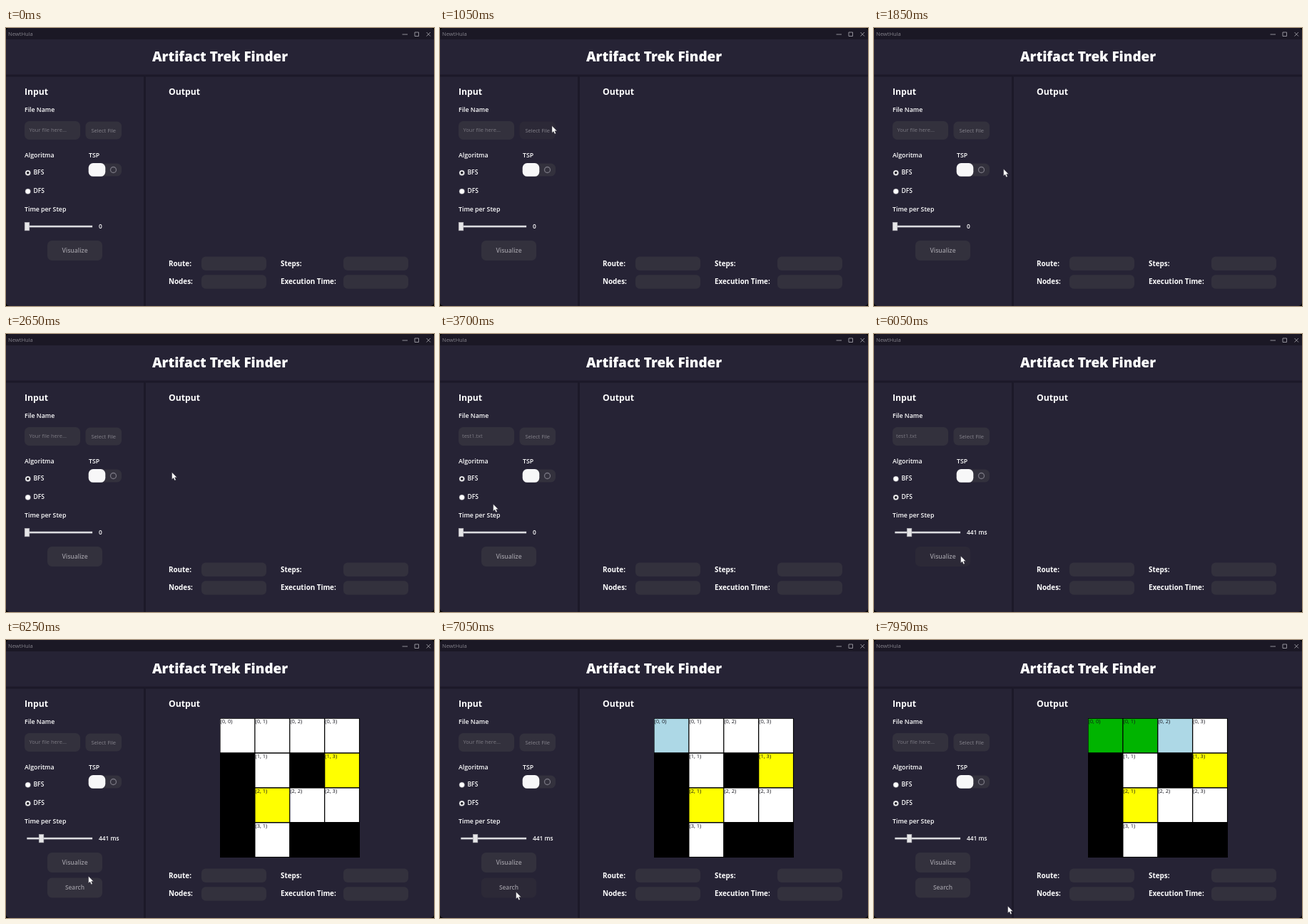
An HTML page that plays this animation: 600 px wide and 391 px high, repeating every 8000 ms.

```html
<!DOCTYPE html>
<html lang="en">
<head>
<meta charset="utf-8">
<title>Grid path demo</title>
<style>
  html, body { margin: 0; width: 100%; height: 100%; overflow: hidden; background: #000; }
  svg { display: block; width: 100vw; height: 100vh; background: #262335; border-radius: 5px; }
  text { font-family: "Open Sans", "Noto Sans", sans-serif; }
</style>
</head>
<body>
<svg id="stage" viewBox="0 0 600 391"></svg>
<script>
const NS = "http://www.w3.org/2000/svg";
const stage = document.getElementById("stage");
const LOOP = 8000, TICK = 50;
const FIELD = "#33313d", HOVER = "#2c2937", EDGE = "#1c1929", DIM = "#85838c";

function add(tag, attrs, parent = stage) {
  const el = document.createElementNS(NS, tag);
  for (const k in attrs) el.setAttribute(k, attrs[k]);
  parent.appendChild(el);
  return el;
}
const rect = (x, y, width, height, fill, rx = 0, parent) =>
  add("rect", { x, y, width, height, fill, rx }, parent);

function label(str, x, y, size, weight = 400, fill = "#fff", anchor = "start", parent) {
  const el = add("text", { x, y, "font-size": size, "font-weight": weight, fill, "text-anchor": anchor }, parent);
  el.textContent = str;
  return el;
}
const heading = (str, x) => label(str, x, 93.5, 12.2, 700);
const caption = (str, x, y) => label(str, x, y, 8.75, 600);

function button(str, x, y, w, h, size, weight, fill) {
  const g = add("g", {});
  const box = rect(x, y, w, h, FIELD, 6.5, g);
  label(str, x + w / 2, y + h / 2 + size * 0.34, size, weight, fill, "middle", g);
  const hover = (px, py) => {
    const over = px >= x && px <= x + w && py >= y && py <= y + h;
    box.setAttribute("fill", over ? HOVER : FIELD);
  };
  return { g, hover };
}

function radio(str, y) {
  add("circle", { cx: 30.7, cy: y, r: 3.8, fill: "#fff", stroke: "#5d5b68", "stroke-width": 0.5 });
  const dot = add("circle", { cx: 30.7, cy: y, r: 1.9, fill: "#211f2b" });
  label(str, 38.5, y + 2.6, 8.5, 600);
  return dot;
}

const show = (el, on) => el.setAttribute("visibility", on ? "visible" : "hidden");

// Window frame
rect(0, 0, 600, 16, "#1b1825");
label("NewtHula", 3, 11, 7.6, 400, DIM);
add("path", { d: "M555.5 9H563M573 6H578.5V11.5H573ZM589.5 6L595 11.5M595 6L589.5 11.5",
  fill: "none", stroke: "#b0afb6", "stroke-width": 0.8 });
rect(0, 65.5, 600, 3, EDGE);
rect(193, 68, 3, 323, EDGE);
label("Artifact Trek Finder", 300, 46.5, 18.9, 800, "#fff", "middle");

// Input panel
heading("Input", 26);
caption("File Name", 26, 118);
rect(26, 131, 78, 26, FIELD, 6.5);
const fileText = label("", 32, 146.3, 7.5, 400, "#7b7982");
const pick = button("Select File", 111.5, 131.5, 50.5, 25, 7.55, 400, DIM);
caption("Algoritma", 26, 181.5);
caption("TSP", 116, 181.5);
rect(116, 190.5, 46, 18, FIELD, 6.5);
rect(115.7, 190, 23.6, 18.8, "#f7f7f8", 6.5);
add("circle", { cx: 150.5, cy: 199.5, r: 4, fill: "none", stroke: "#777580", "stroke-width": 1.3 });
const bfs = radio("BFS", 203.7);
const dfs = radio("DFS", 229.8);
caption("Time per Step", 26, 257.5);
rect(29.3, 277.8, 91.8, 2.6, "#dcdce0");
const knob = rect(0, 273.3, 6.6, 11.6, "#e6e6e8");
knob.setAttribute("stroke", "#adacb2");
knob.setAttribute("stroke-width", 0.6);
const delay = label("0", 130, 281.6, 8.4, 600);
const visualize = button("Visualize", 58, 299, 77, 28, 8.6, 600, "#9b99a1");
const search = button("Search", 58, 334.5, 77, 28, 8.4, 600, "#9b99a1");

// Output panel
heading("Output", 228);
[["Route:", "Nodes:"], ["Steps:", "Execution Time:"]].forEach((names, col) =>
  names.forEach((str, row) => {
    label(str, 228 + col * 157, 334.6 + row * 25.6, 9.85, 700);
    rect(274 + col * 199, 321.5 + row * 25.7, 91, 19.5, FIELD, 6);
  }));

// Maze: "." open, "T" treasure, "#" wall
const maze = add("g", {});
rect(300, 110, 196, 196, "#000", 0, maze);
const topRow = [];
["....", "#.#T", "#T..", "#.##"].forEach((line, r) => [...line].forEach((ch, c) => {
  if (ch === "#") return;
  const x = 300.6 + 48.9 * c, y = 110.8 + 48.9 * r;
  const cell = rect(x, y, 47.6, 47.4, ch === "T" ? "#ffff00" : "#fff", 0, maze);
  label(`(${r}, ${c})`, x, y + 6.6, 7.5, 400, "#14141c", "start", maze);
  if (r === 0) topRow.push(cell);
}));

const arrow = add("path", { d: "M.6 .2v9.9l2.2-2l1.6 3.6l1.8-.8l-1.6-3.5h3.1z",
  fill: "#fff", stroke: "#22202a", "stroke-width": 0.4 });

// Pointer stops: arrival time, x, y and glide length when not the usual one
const GLIDE = 150, JUMP = 50;
const stops = [
  [250, 178, 156, 200], [850, 155, 144, JUMP], [1100, 157, 134],
  [1850, 181, 198, 550], [2150, 189, 174], [2450, 199, 153],
  [2750, 298, 277], [2950, 299, 292], [3200, 265, 283, JUMP],
  [3700, 74, 239, JUMP], [4050, 31, 229], [4200, 28, 274],
  [4750, 41, 278, 250], [5500, 51, 278, 350], [6050, 121, 312, 350],
  [6300, 112, 342], [6600, 106, 354, JUMP], [7800, 187, 374, JUMP]
];

function pointer(t) {
  let x = 439, y = 16;
  for (const [at, tx, ty, glide = GLIDE] of stops) {
    const k = Math.min(1, Math.max(0, 1 - (at - t) / glide));
    x += (tx - x) * k;
    y += (ty - y) * k;
  }
  return [x, y];
}

// The knob follows the pointer while it is held
function stepTime(t) {
  if (t < 4500) return 0;
  const [x] = pointer(Math.min(t, 5500));
  return Math.max(0, Math.round(211 + (x - 41) * 23));
}

function draw(ms) {
  const t = Math.floor((ms % LOOP) / TICK) * TICK;

  const [x, y] = pointer(t);
  arrow.setAttribute("transform", `translate(${x} ${y})`);
  show(arrow, t > 0);
  [pick, visualize, search].forEach(b => b.hover(x, y));

  const picked = t >= 3200 && t < 6250;
  fileText.textContent = picked ? "test1.txt" : "Your file here...";
  fileText.setAttribute("x", picked ? 31 : 32.5);
  show(bfs, t < 4050);
  show(dfs, t >= 4050);

  const v = stepTime(t);
  knob.setAttribute("x", 26.2 + v / 22);
  knob.setAttribute("fill", t >= 4200 && t < 5750 ? "#c4e4f6" : "#e6e6e8");
  delay.textContent = v ? v + " ms" : "0";

  show(maze, t >= 6250);
  show(search.g, t >= 6250);
  const head = [6800, 7300, 7600].filter(s => t >= s).length - 1;
  topRow.forEach((cell, i) =>
    cell.setAttribute("fill", i < head ? "#00b400" : i === head ? "#add8e6" : "#fff"));
}

const begin = performance.now();
function loop() {
  draw(performance.now() - begin);
  requestAnimationFrame(loop);
}
loop();
</script>
</body>
</html>
```
